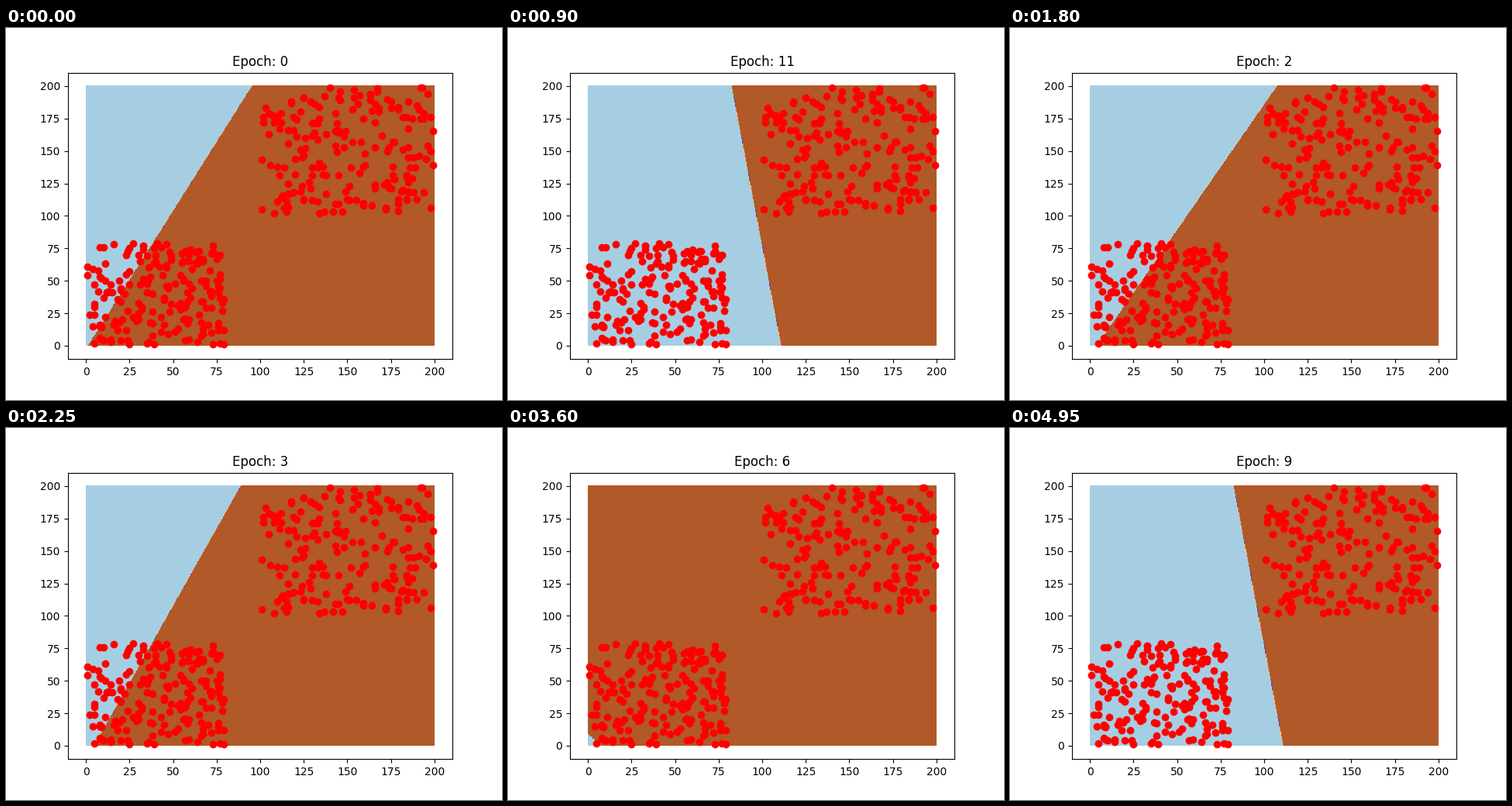
Recreate the animation shown at these times as a matplotlib script. Size 640 by 480 pixels, loop 5400 ms.

```python
import matplotlib.pyplot as plt
import numpy as np
from matplotlib.animation import FuncAnimation

SIZE = 200
LIMITS = (-10.3, 210.3)

# Epochs sorted by name, as the pictures are played.
ORDER = sorted(range(12), key=lambda n: (n > 0, n < 10, n))

# Boundary of each learning epoch: x at y=0 and x at y=SIZE.
LEARNING = [(1.4, 95.5), (2.6, 101.5), (4.2, 107.6), (5, 89),
            (5.6, 62.8), (6.8, -94), (8, -160)]
CONVERGED = (111.1, 82.7)

rng = np.random.default_rng(7)
points = np.vstack([rng.integers(1, 80, (195, 2)),
                    rng.integers(100, 200, (195, 2))])
grid = np.linspace(0, SIZE, 2 * SIZE + 1)
xx, yy = np.meshgrid(grid, grid)

fig, ax = plt.subplots(figsize=(6.4, 4.8), dpi=100)
ax.scatter(*points.T, c="red", zorder=2)
ticks = range(0, SIZE + 1, 25)
ax.set(xlim=LIMITS, ylim=LIMITS, xticks=ticks, yticks=ticks)
title = ax.set_title("Epoch: 0")
regions = []


def draw(i):
    """Show the two predicted classes on both sides of the boundary."""
    epoch = ORDER[i]
    bottom, top = LEARNING[epoch] if epoch < len(LEARNING) else CONVERGED
    predicted = xx > bottom + (top - bottom) * yy / SIZE
    while regions:
        regions.pop().remove()
    regions.append(ax.contourf(xx, yy, predicted.astype(float),
                               cmap="Paired", zorder=1))
    title.set_text(f"Epoch: {epoch}")


anim = FuncAnimation(fig, draw, frames=len(ORDER), interval=450, repeat=True)
plt.show()
```
